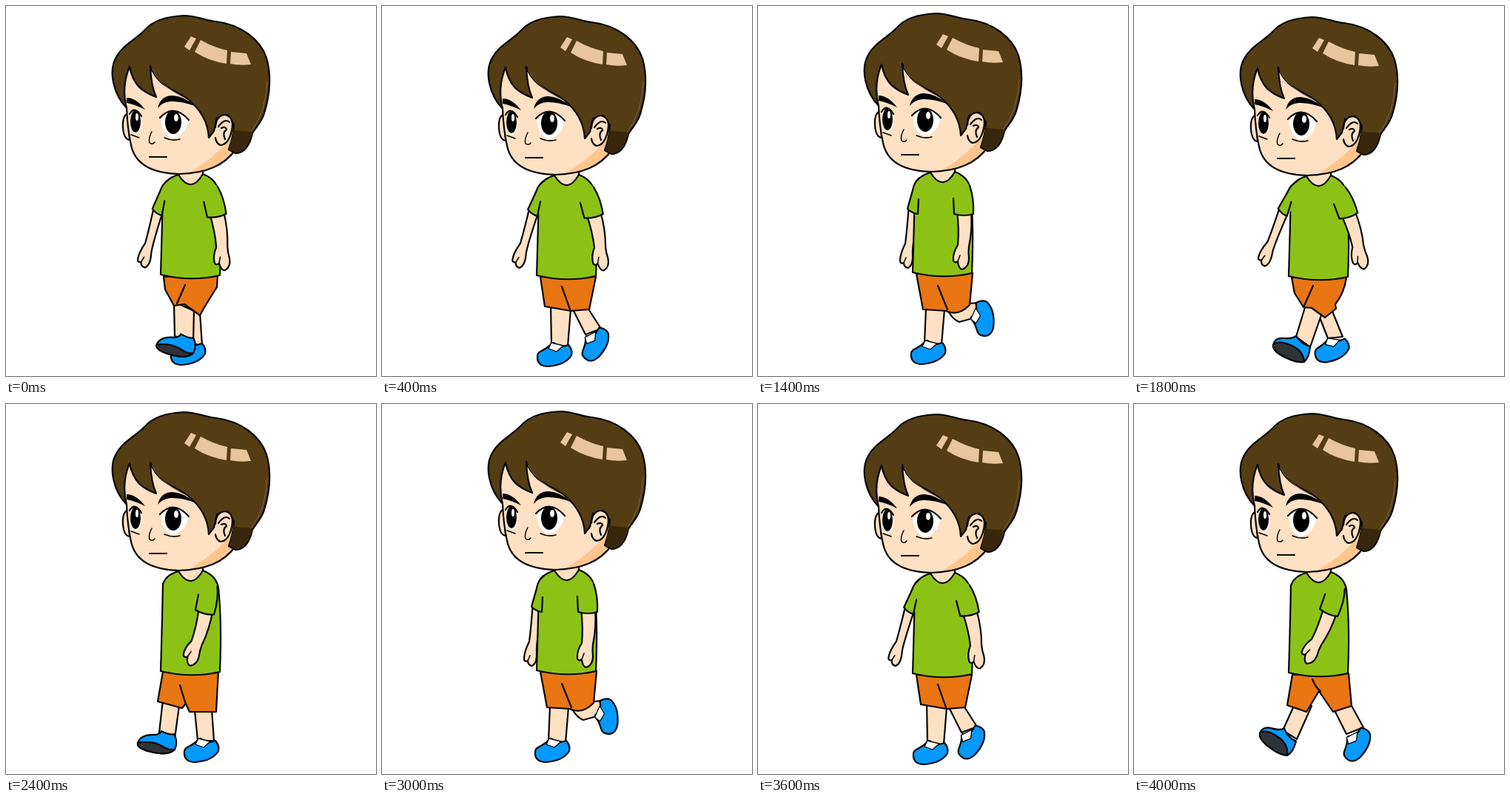
An HTML page that plays this animation: 500x500 px, repeating every 4200 ms.

```html
<!DOCTYPE html>
<html lang="en">
<head>
<meta charset="utf-8">
<title>Walking boy</title>
<style>
html, body { margin: 0; width: 100%; height: 100%; overflow: hidden; background: #fff; }
svg { display: block; width: 100vw; height: 100vh; }
.line { fill: none; }
.skin { fill: #ffe0c2; }
.shirt { fill: #8cc216; }
.shorts { fill: #e97513; }
.shoe { fill: #0499ff; }
.sole { fill: #2f3338; }
.hair { fill: #543c13; }
.sock { fill: #fff; }
.flat { stroke: none; }
</style>
</head>
<body>
<svg viewBox="0 0 500 500" stroke="#050505" stroke-width="2.2" stroke-linejoin="round" stroke-linecap="round">
  <defs>
    <g id="flatShoe">
      <path class="shoe" d="M-28 15C-28 7-16 8-9-2L-6-3Q0 4 7 2L14 0Q20 7 18 14Q10 27-13 29Q-29 29-28 15Z"/>
      <path class="sock" stroke-width="1.3" d="M-9-3L7 1L-2 9L-13 5Z"/>
    </g>
    <g id="liftedShoe">
      <path class="shoe" d="M-44 10Q-40-2-20-1Q-14-2-12-6Q0 0 5-2Q11 8 6 19Q-2 27-22 23Q-46 18-44 10Z"/>
      <path class="sole" d="M-44 10Q-24 6-10 15Q-2 20 6 19Q-2 27-22 23Q-46 18-44 10Z"/>
    </g>
    <g id="heelShoe">
      <path class="shoe" d="M-45 3Q-43-7-30-6Q-20-5-14-9Q-6 3 5 5Q4 20-3 26Q-14 27-26 21Q-46 12-45 3Z"/>
      <path class="sole" d="M-45 3Q-38-4-22 3Q-4 10-3 26Q-14 27-26 21Q-46 12-45 3Z"/>
    </g>
  </defs>

  <g id="farLeg"><path class="skin"/><use/></g>
  <g id="nearLeg"><path class="skin"/><use/></g>
  <path id="shorts" class="shorts"/>
  <path id="crease" class="line"/>

  <g id="upper">
    <g class="farArm">
      <path class="skin" d="M204 270Q202 300 199 324Q192 338 192 347Q192 352 197 350Q197 356 203 357Q210 353 209 338Q208 330 216 282Z"/>
      <path class="line" stroke-width="1.5" d="M197 350L200 343"/>
    </g>
    <path class="skin" d="M233 218H266V238L250 246L233 238Z"/>
    <path class="shirt" d="M233 228Q217 232 212 245Q211 300 209 363Q250 373 289 364Q292 300 287 250Q284 234 266 227Q250 255 233 228Z"/>
    <g class="farArm">
      <path class="shirt flat" d="M231 232Q212 236 209 252L202 277Q208 283 216 284L226 262Z"/>
      <path class="line" d="M218 235Q211 241 209 252L202 277Q208 283 216 284L217 264"/>
    </g>
    <g id="nearArm">
      <path class="skin" d="M269 280Q272 305 270 326Q263 337 264 347Q266 351 270 348Q271 358 276 359Q285 356 285 344Q284 336 285 328Q290 305 288 280Z"/>
      <path class="line" stroke-width="1.5" d="M270 348L273 340"/>
      <path class="shirt flat" d="M265 245L264 284Q279 289 291 284Q292 262 286 246Q278 234 265 245Z"/>
      <path class="line" d="M264 263L265 284Q279 288 291 284Q292 262 286 246"/>
    </g>

    <path class="skin" d="M165 145Q157 148 158 164Q159 180 167 181Z"/>
    <path class="skin flat" d="M158 118L163 138Q164 165 169 188C174 212 194 226 234 227C270 226 295 216 311 193L298 120L205 75L165 78Z"/>
    <path class="flat" fill="#ffc58d" d="M250 224Q281 205 303 180L310 193Q292 220 250 224Z"/>
    <path class="line" d="M163 138Q164 165 169 188C174 212 194 226 234 227C270 226 295 216 311 193"/>

    <path class="hair" d="M163 138C145 119 138 88 149 69C158 52 176 45 188 32C200 18 220 14 240 13C258 13 270 20 284 21C318 25 344 46 352 70C359 94 356 122 349 145C345 158 338 163 333 172Q327 199 310 199L301 194Q307 177 308 160L299 147L285 151L281 169L274 178C273 156 263 140 246 126C230 113 205 110 195 81Q196 108 203 123C185 116 172 108 167 82C159 101 158 118 163 138Z"/>
    <path class="flat" fill="#38270c" d="M307 167Q320 170 334 169Q326 198 310 198L302 194Z"/>
    <path class="line" stroke-width="1" stroke="#77664b" d="M197 85Q207 107 239 123M353 102Q351 145 331 170"/>

    <path class="skin" d="M283 164Q284 148 296 147Q309 150 305 168Q301 187 290 188Q284 186 283 178"/>
    <path class="line" d="M287 163Q296 151 302 157M291 165Q297 162 298 167Q292 171 296 180"/>

    <g fill="#e7c69c" class="flat">
      <path d="M250 41L257 44L248 60L241 55Z"/>
      <path d="M263 46Q281 56 299 60L298 78Q273 74 255 62Z"/>
      <path d="M304 62L325 64L331 79Q316 81 303 78Z"/>
    </g>

    <path class="flat" d="M163 124Q176 124 188 140Q174 133 163 131ZM205 138Q209 121 225 121Q241 122 255 135Q236 128 222 129Q211 130 205 138Z"/>
    <path class="flat" fill="#fff" d="M168 145Q178 135 184 151Q186 168 175 174Q167 169 168 145ZM209 151Q227 132 246 154Q244 174 226 179Q211 176 209 151Z"/>
    <g class="flat">
      <ellipse cx="175" cy="156" rx="7" ry="15"/>
      <ellipse cx="226" cy="157" rx="11" ry="16"/>
      <ellipse cx="177" cy="150" rx="2" ry="5" fill="#fff"/>
      <ellipse cx="230" cy="151" rx="3" ry="5" fill="#fff"/>
    </g>
    <path class="line" d="M167 146Q174 134 183 149M208 151Q227 131 247 154"/>
    <path class="line" stroke-width="1.5" d="M169 174L180 178M214 178Q225 183 235 180M197 170Q192 179 194 185Q198 188 201 184"/>
    <path class="line" d="M194 204H217"/>
  </g>
</svg>
<script>
const STEP = 200;
// Order of the walk poses over one loop.
const ORDER = "ABCDEFGHABCCEFGHABCEF";

// dy: body bob; near, far: arm angles (null: hidden by the body); feet: [type, x, y, angle].
const POSES = {
  A: { dy: 0, near: -10, far: 8,
    farLeg: "M250 410L262 414L265 458L250 458Z", farFoot: ["flat", 251, 456, 0],
    nearLeg: "M227 400L228 446L253 456L254 412Z", nearFoot: ["lifted", 248, 450, 3],
    shorts: "M213 366L215 383L227 405L241 403L262 418Q272 400 285 380L286 364Z",
    crease: "M242 377L231 402" },
  B: { dy: 2, near: -18, far: 14,
    farLeg: "M249 416L262 449L282 447L267 410Z", farFoot: ["flat", 271, 451, -6],
    nearLeg: "M232 404L219 447L238 461L254 415Z", nearFoot: ["heel", 233, 455, 0],
    shorts: "M213 367L217 388L229 407L240 408L258 421L273 409L272 403Q284 388 287 367Z",
    crease: "M242 378L230 405" },
  C: { dy: 1, near: -12, far: 9,
    farLeg: "M258 410L275 444L296 436L278 408Z", farFoot: ["flat", 283, 444, -42],
    nearLeg: "M228 404L229 458L251 460L255 410Z", nearFoot: ["flat", 238, 458, 0],
    shorts: "M214 366L220 406L255 412L280 410L289 366Z",
    crease: "M243 379L254 410" },
  D: { dy: -2, near: 2, far: -2,
    farLeg: "M256 408Q264 428 280 430L298 418L290 404Z", farFoot: ["flat", 288, 420, -75],
    nearLeg: "M236 408L243 458L266 460L264 410Z", nearFoot: ["flat", 253, 458, 0],
    shorts: "M214 366L224 410L266 414L288 406L290 362Z",
    crease: "M243 379L250 400" },
  E: { dy: -2, near: 14, far: null,
    farLeg: "M212 400L207 444L228 452L234 408Z", farFoot: ["lifted", 222, 448, 0],
    nearLeg: "M255 414L259 455L281 455L278 412Z", nearFoot: ["flat", 269, 455, 0],
    shorts: "M212 362L205 402L238 411L243 405L248 416L284 416L287 360Z",
    crease: "M235 380L243 406" },
  F: { dy: 0, near: 22, far: null,
    farLeg: "M217 406L201 441L220 453L240 408Z", farFoot: ["heel", 215, 450, 11],
    nearLeg: "M270 412L287 446L310 437L293 406Z", nearFoot: ["flat", 296, 447, -42],
    shorts: "M214 366L207 407L233 416L250 388L269 416L294 408L290 364Z",
    crease: "M241 372Q246 384 252 388" },
  G: { dy: -1, near: 13, far: null,
    farLeg: "M222 406L211 452L233 458L246 408Z", farFoot: ["flat", 222, 456, 0],
    nearLeg: "M262 410L274 424L292 440L303 424L288 404Z", nearFoot: ["flat", 294, 434, -62],
    shorts: "M214 364L214 408L246 412L252 402L266 416L291 406L290 362Z",
    crease: "M242 374L252 402" },
  H: { dy: -3, near: 0, far: 0,
    farLeg: "M227 408L225 455L248 458L252 410Z", farFoot: ["flat", 235, 455, 0],
    nearLeg: "M250 408L258 414Q264 424 272 427L290 422L302 410L299 401L285 402Z", nearFoot: ["flat", 292, 415, -80],
    shorts: "M214 362L223 410L254 412Q270 420 286 404L290 361Z",
    crease: "M243 378L256 410" }
};

const $ = id => document.getElementById(id);
const set = (el, name, value) => el.setAttribute(name, value);
const farArm = document.querySelectorAll(".farArm");

function drawLeg(id, path, [type, x, y, angle]) {
  const [leg, shoe] = $(id).children;
  set(leg, "d", path);
  set(shoe, "href", `#${type}Shoe`);
  set(shoe, "transform", `translate(${x} ${y}) rotate(${angle})`);
}

function drawPose(p) {
  drawLeg("farLeg", p.farLeg, p.farFoot);
  drawLeg("nearLeg", p.nearLeg, p.nearFoot);
  set($("shorts"), "d", p.shorts);
  set($("crease"), "d", p.crease);
  set($("upper"), "transform", `translate(0 ${p.dy})`);
  set($("nearArm"), "transform", `rotate(${p.near} 276 245)`);
  for (const part of farArm) {
    set(part, "visibility", p.far === null ? "hidden" : "visible");
    set(part, "transform", `rotate(${p.far ?? 0} 220 245)`);
  }
}

let start;
function tick(now) {
  start ??= now;
  const step = Math.floor((now - start) / STEP) % ORDER.length;
  drawPose(POSES[ORDER[step]]);
  requestAnimationFrame(tick);
}
drawPose(POSES.A);
requestAnimationFrame(tick);
</script>
</body>
</html>
```
